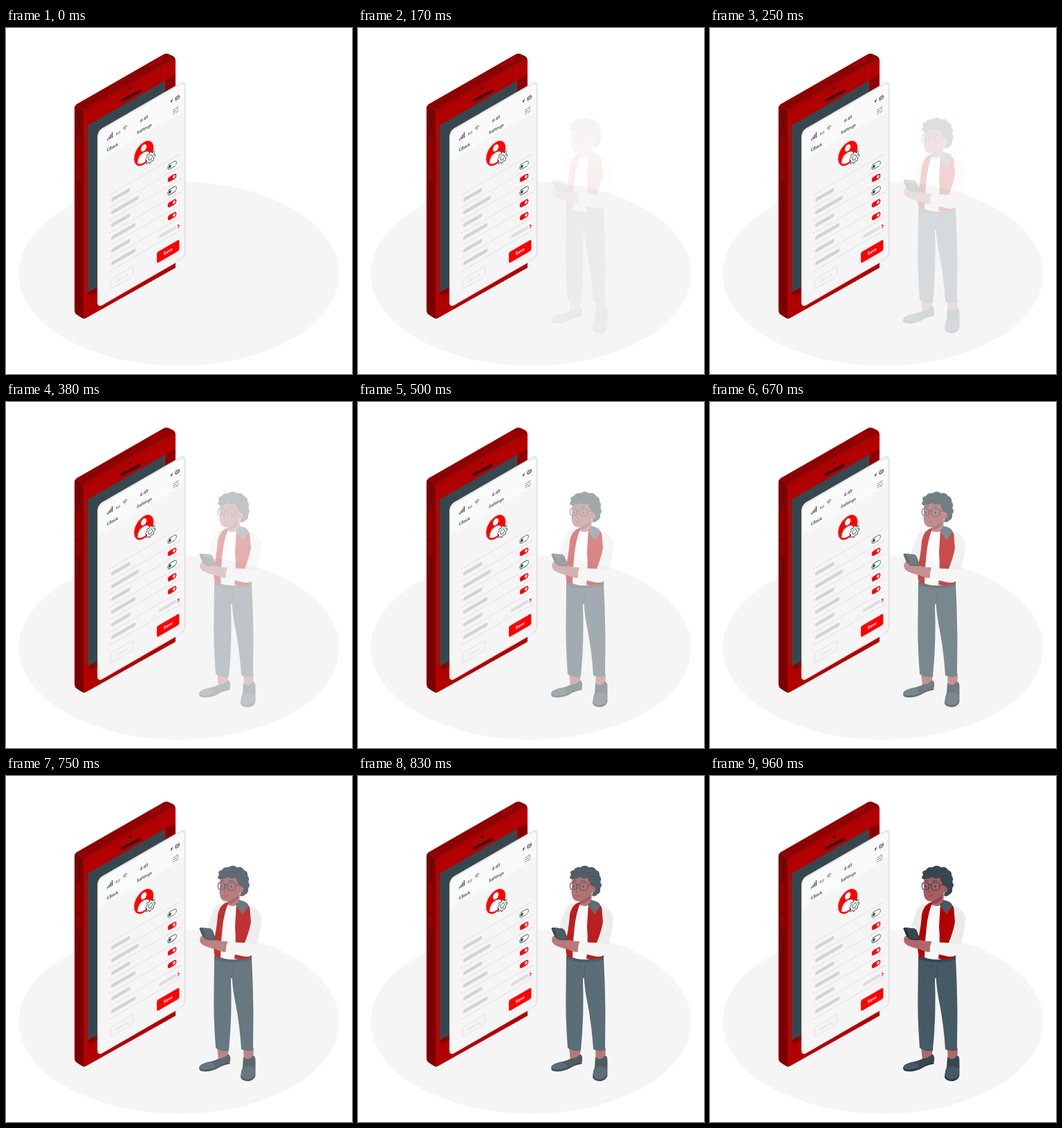
Animation of 500x500 px, one loop 1000 ms. Source, as an HTML page:

```html
<!DOCTYPE html>
<html lang="en">
<head>
<meta charset="utf-8">
<style>
html, body { margin: 0; height: 100%; overflow: hidden; background: #fff; }
svg { display: block; width: 100vw; height: 100vh; }
text { font: 600 6.3px Inter, sans-serif; fill: #37474f; }
.mid { text-anchor: middle; }
.line { fill: none; stroke: #37474f; stroke-linecap: round; stroke-linejoin: round; }
</style>
</head>
<body>
<svg viewBox="0 0 500 500">
  <ellipse cx="250" cy="355" rx="231.5" ry="133" fill="#f5f5f5"/>

  <!-- handset: top, front, side -->
  <path fill="#8e0000" d="M99 117Q99 111 104 109L227 38.500Q232 36 236 38L242 41Q245 43 245 48L113 124Z"/>
  <path fill="#b20000" d="M113 124Q113 121 115 119.500L240 47Q245 44.500 245 49V346.500L116 419Q114 420 113 420Z"/>
  <path fill="#7d0000" d="M99 117Q99 113 101 112L110 117Q113 119 113 124V420Q111 420 108 418L102 414Q99 412 99 407Z"/>
  <path fill="none" stroke="#c92a2a" stroke-width=".5" d="M101 112L110 117Q113 119 113 124V419M112 119L240 46"/>
  <path fill="none" stroke="#960000" stroke-width="6" stroke-linecap="round" d="M104.500 160V193M104.500 204V218"/>
  <path fill="none" stroke="#a80000" stroke-width="4" stroke-linecap="round" d="M209 54L225 45"/>
  <path fill="#37474f" d="M118 141L230 76V330L118 382Z"/>
  <path fill="#8a0000" d="M231 75.500L244 68V90L231 92ZM118 382L132 374V383L121 389Z"/>
  <path fill="none" stroke="#401018" stroke-width="4" stroke-linecap="round" d="M167 105L193 91.500"/>
  <circle cx="179.500" cy="88" r="2" fill="#401018"/>

  <!-- floating screen, drawn flat and projected -->
  <g transform="matrix(.866 -.5 0 1 132 0)">
    <rect y="148.800" width="147.500" height="256" rx="8" fill="#e4e4e4"/>
    <rect x="2" y="151.300" width="143" height="252" rx="7" fill="#f5f5f5"/>
    <path fill="#fafafa" d="M2 192V158.300Q2 151.300 9 151.300H138Q145 151.300 145 158.300V192Z"/>
    <path stroke="#37474f" stroke-width="1.500" d="M17 171V168.500M19.600 171V167M22.200 171V165M24.800 171V163"/>
    <text class="mid" x="34.500" y="171" style="font-size:5.500px;font-weight:400">4G</text>
    <path class="line" stroke-width="1" d="M43.200 166.400Q46.200 163.600 49.200 166.400M44.600 168.300Q46.200 166.900 47.800 168.300M46.200 170.200V170.300"/>
    <text class="mid" x="78" y="172.500">4:45</text>
    <path fill="#37474f" d="M121 167.500L126 165L124 170.200L123.400 168Z"/>
    <rect x="130" y="165.300" width="7" height="4.800" rx="1.800" fill="#a9b3b7" stroke="#37474f" stroke-width=".7"/>
    <path class="line" stroke-width="1" d="M18.300 182.800L16.500 184.800L18.300 186.800"/>
    <text x="19.800" y="187">Back</text>
    <text class="mid" x="78.500" y="187">Settings</text>
    <path class="line" stroke-width=".7" d="M126.500 181.500H128.500M130.500 181.500H135M126.500 184.500H131.500M133.500 184.500H135M126.500 187.500H128.500M130.500 187.500H135"/>

    <circle cx="77.600" cy="219.900" r="16.200" fill="#f00"/>
    <circle cx="77.400" cy="212" r="4.700" fill="#fff"/>
    <path fill="#fff" d="M67 229Q67.500 218.500 77.400 218.500Q87.300 218.500 87.800 229Q83 233.500 77.400 233.500Q71.800 233.500 67 229Z"/>
    <g transform="translate(88.500 231.400)" class="line" stroke-width=".9">
      <path id="gear" fill="#f5f5f5"/><circle r="3.300"/>
    </g>
    <g id="rows"></g>
    <path class="line" style="stroke:#f00" stroke-width="1.200" d="M134.500 352L136.500 354.200L134.500 356.400"/>
    <rect x="99.300" y="373.800" width="37.400" height="16" rx="2.500" fill="#f00"/>
    <text class="mid" x="118" y="384" style="fill:#fff;font-weight:700">Save</text>
    <rect x="22.300" y="374.300" width="37.500" height="14" rx="2" fill="none" stroke="#d9d9d9" stroke-width=".9"/>
    <text class="mid" x="41" y="383.800" style="fill:#dcdcdc;font-weight:500">Cancel</text>
  </g>

  <g id="man" opacity="0">
    <!-- legs and shoes -->
    <path fill="#b16668" d="M305 392H322L320 410H307ZM343 393H358L357 412H344Z"/>
    <path fill="#37474f" d="M308 408Q314 409 321 402Q325 404 324 411L323 416Q312 418 305 423Q292 429 281 426Q277 422 281 418Q285 415 294 413Q303 411 308 408Z"/>
    <path fill="#37474f" d="M343 406Q350 413 357 404Q361 405 360.500 413V431Q360 439 351 441Q339 441 339 434Q340 426 342 421Z"/>
    <path fill="#455a64" d="M281 418Q285 415 294 413Q302 416 302 421Q290 426 280 423Q279 420 281 418ZM341 423Q351 416 360 423L359.500 433Q350 441 340 435Q339 430 341 423Z"/>
    <path fill="none" stroke="#263238" stroke-width="1.300" d="M279.500 423Q283 427 295 425Q303 423 307 420Q315 416 323.500 415M339.500 434Q341 440 350 440Q358 439 360 432"/>
    <path fill="#455a64" d="M301 260L355 261Q357 300 357.500 340L357 396Q348 399 340 395Q338 362 332 330Q328 312 326.500 291L325 293Q327 345 322 397Q312 399 303 393Q299.500 345 300.500 310Z"/>
    <path fill="#37474f" d="M301 260Q328 270 355 260V266Q328 273 301 265Z"/>
    <path class="line" stroke-width=".8" d="M326.500 291L328 274M309 269Q313 276 322 276"/>

    <!-- torso -->
    <path fill="#ebebeb" d="M312 184Q303 185 299 194L291 217Q290 229 301 234L306 236Z"/>
    <path fill="#fafafa" d="M315 184L334 182L340 200L334 265Q320 266 310 262L309 215Z"/>
    <path fill="#b16668" d="M320 176L338 170L337 184Q329 191 320 186Z"/>
    <path fill="#b20000" d="M321 182Q310 184 306 200Q305 217 301 236Q299 251 302 261L310 263Q310 240 313 218Q315 199 321 184Z"/>
    <path fill="#b20000" d="M333 184L347 183Q357 192 357 215L355 261Q342 267 330 264Q333 245 331 217Z"/>
    <path fill="#455a64" d="M337 179L344 181Q350 184 350 188L342 200L333 188Z"/>

    <!-- hands and handset -->
    <path fill="#b16668" d="M320 239Q307 239 299 235L287 230Q281 231 280 236Q280 242 286 245Q295 249 302 250Q311 255 320 254Z"/>
    <path fill="#263238" d="M281 219L295 220.500Q297.500 221 298.500 223L303 235Q303 237.500 301 237.500L288 236.500Q286 236 285 234L279.500 221Q279 219.500 281 219Z"/>
    <path fill="#37474f" d="M283 219L296 220.500L302.500 236L289 235.500Z"/>
    <path fill="none" stroke="#b16668" stroke-width="3.500" stroke-linecap="round" d="M283 233L288 238M285 239L294 241"/>
    <path fill="#ebebeb" d="M352 187Q366 191 369 204Q369 217 365 233L360 253Q356 262 345 261V241Q352 223 354 211Z"/>
    <path fill="#f5f5f5" d="M362 243L360 253Q356 262 345 261L318 255Q317 247 320 240L345 241Z"/>

    <!-- head -->
    <path fill="#8a484b" d="M321 181L335 172L336 177Q330 184 322 185Z"/>
    <path fill="#a95d60" d="M311 143Q308 152 309 160L308.500 168Q309 177 314 180Q321 183 331 176Q340 171 342 157L338 143Z"/>
    <path fill="#37474f" d="M308 149Q304 147 308 143Q305 137 312 136Q315 131 321 132Q328 127 334 132Q341 130 344 136Q350 138 349 144Q353 148 350 153Q354 158 350 162Q351 169 346 171Q343 175 338 173Q340 168 339 160L336 156Q333 152 332 147Q326 150 321 146Q315 150 308 149Z"/>
    <ellipse cx="339.500" cy="164" rx="3.600" ry="4.700" fill="#a95d60"/>
    <g class="line" stroke-width="1.200">
      <rect x="306.500" y="154" width="9.500" height="10" rx="3.500"/>
      <rect x="320" y="154" width="12" height="11" rx="4"/>
      <path d="M316 158Q318 156 320 158M332 158L340 157M311 151.500L315 151M322 151.500L328 152"/>
    </g>
    <path fill="none" stroke="#7d3d41" stroke-width=".8" d="M317.500 160L315.500 167.500L318 168M314 173Q318 175 322 172.500"/>
    <path fill="#263238" d="M311 158.500h1.800v2.500h-1.800ZM324.700 158.500h1.800v2.500h-1.800Z"/>
  </g>
</svg>
<script>
const $ = id => document.getElementById(id);

// 8-toothed cog: four corners per tooth
let cog = "";
for (let i = 0; i < 32; i++) {
  const r = i % 4 < 2 ? 8.3 : 6.2, a = i * Math.PI / 16;
  cog += (i ? "L" : "M") + (r * Math.cos(a)).toFixed(2) + " " + (r * Math.sin(a)).toFixed(2);
}
$("gear").setAttribute("d", cog + "Z");

const pill = (x, y, w, h, style) =>
  `<rect x="${x}" y="${y - h / 2}" width="${w}" height="${h}" rx="${h / 2}" ${style}/>`;
const toggle = (y, on) =>
  pill(117.5, y, 14.5, 7.5, on ? 'fill="#f00"' : 'fill="#fff" stroke="#37474f" stroke-width=".9"') +
  `<circle cx="${on ? 128 : 121}" cy="${y}" r="2.2" fill="${on ? "#fff" : "#37474f"}"/>`;

let rows = "";
for (let i = 0; i < 7; i++) {
  const y = 251.3 + 18.4 * i, mid = y + 9.2;
  rows += `<path stroke="#dcdcdc" stroke-width=".8" d="M19.600 ${y}H139.700"/>`;
  if (i > 5) continue;
  rows += pill(23, mid, i % 2 ? (i === 1 ? 46 : 41) : 32, 5.2, 'fill="#d3d3d3"');
  rows += i < 5 ? toggle(mid, i % 2 || i === 4) : pill(102.5, mid + 1, 29.5, 5, 'fill="#dedede"');
}
$("rows").innerHTML = rows;

// The fade advances in steps of 1/24 s, with two longer holds near the start
const steps = [170, 250, 330, 380, 420, 460, 500, 540, 580, 630, 670, 710, 750, 790, 830, 880, 920, 960];
const keys = [[170, .06], [250, .17], [380, .31], [580, .58], [750, .8], [960, 1]];

function fade(t) {
  const s = steps.filter(v => v <= t).pop();
  if (s === undefined) return 0;
  const k = Math.max(1, keys.findIndex(p => p[0] >= s));
  const [t0, a] = keys[k - 1], [t1, b] = keys[k];
  return a + (b - a) * (s - t0) / (t1 - t0);
}

function draw() {
  $("man").setAttribute("opacity", fade(performance.now() % 1000));
  requestAnimationFrame(draw);
}
draw();
</script>
</body>
</html>
```
